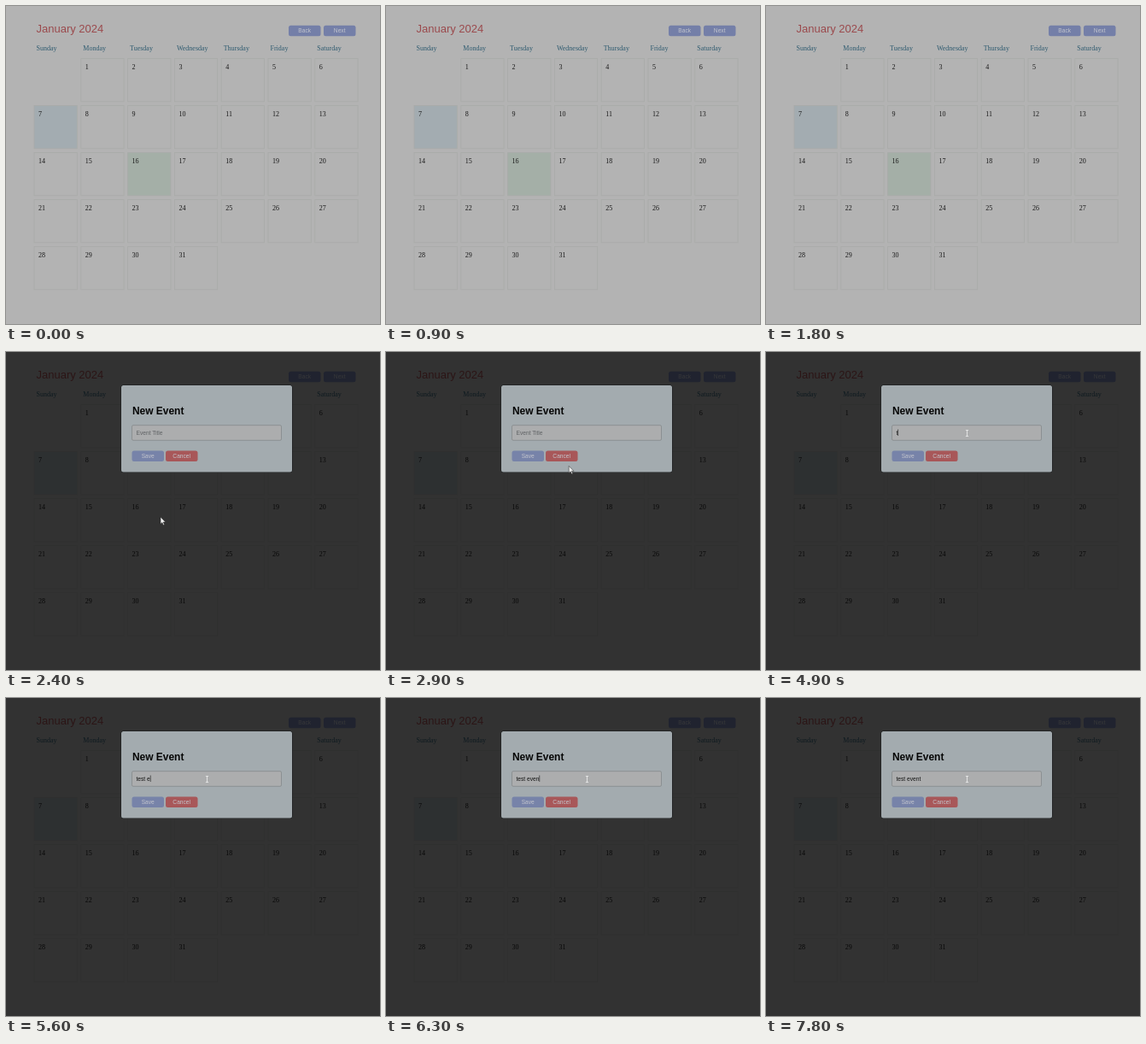
Recreate the animation shown at these times as an HTML page. Size 438 px wide and 372 px high, loop 8000 ms.

```html
<!DOCTYPE html>
<html lang="en">
<head>
<meta charset="utf-8">
<title>Calendar: new event</title>
<style>
html, body { margin: 0; width: 100%; height: 100%; overflow: hidden; background: #b3b3b3; }
svg { display: block; width: 438px; height: 372px; }
text { white-space: pre; }
.serif { font: 8px "Liberation Serif", "Times New Roman", serif; }
.sans { font: 6.65px "Liberation Sans", Arial, sans-serif; }
.month { font-size: 13px; }
.heading { font-size: 11.95px; font-weight: bold; }
</style>
</head>
<body>
<svg id="stage" viewBox="0 0 438 372">
  <rect width="438" height="372" fill="#b3b3b3"/>
  <g id="calendar"></g>
  <g id="dialog">
    <rect width="438" height="372" fill="#000" fill-opacity=".72"/>
    <rect x="134.5" y="38.5" width="201" height="102.5" rx="3" fill="#16191a"/>
    <rect x="135" y="39" width="200" height="101.5" rx="2.5" fill="#a3abaf"/>
    <text class="sans heading" x="148" y="72.8" fill="#050505">New Event</text>
    <rect x="147.5" y="85.7" width="175" height="17.6" rx="1.5" fill="#acadae" stroke="#85898b" stroke-width=".8"/>
    <text id="entry" class="sans" x="152.5" y="96.6"></text>
    <rect id="caret" y="90.5" width=".6" height="7.5" fill="#151515"/>
    <g id="actions"></g>
    <path id="arrow" d="M0 0V8.2L1.9 6.5L3.2 9.5L4.5 8.9L3.2 6H5.8Z" fill="#eee" stroke="#222" stroke-width=".5"/>
    <path id="beam" d="M-1.6-3.5H1.6M0-3.5V3.5M-1.6 3.5H1.6" fill="none" stroke="#e8e8e8" stroke-width=".9"/>
  </g>
</svg>
<script>
const byId = id => document.getElementById(id);

function add(parent, tag, attrs, content = "") {
  const node = document.createElementNS("http://www.w3.org/2000/svg", tag);
  for (const key in attrs) node.setAttribute(key, attrs[key]);
  node.textContent = content;
  return parent.appendChild(node);
}

function addButton(parent, x, y, label, fill) {
  add(parent, "rect", { x, y, width: 37.5, height: 12.5, rx: 2.5, fill });
  add(parent, "text", { class: "sans", x: x + 18.7, y: y + 8.6, fill: "#c3c5cc", "text-anchor": "middle" }, label);
}

function buildCalendar() {
  const root = byId("calendar");
  const pitch = 54.8;
  const fills = { 7: "#a3acb1", 16: "#a4afa7" };
  add(root, "text", { class: "sans month", x: 35.5, y: 31, fill: "#9b4a4d" }, "January 2024");
  addButton(root, 331, 22.7, "Back", "#747fa8");
  addButton(root, 372, 22.7, "Next", "#747fa8");

  ["Sunday", "Monday", "Tuesday", "Wednesday", "Thursday", "Friday", "Saturday"].forEach((name, i) =>
    add(root, "text", { class: "serif", x: 35.5 + i * pitch, y: 52.2, fill: "#2f5b70" }, name));

  for (let day = 1; day <= 31; day++) {
    const x = 33 + day % 7 * pitch;
    const y = 61.5 + Math.floor(day / 7) * 55;
    const cell = add(root, "rect", {
      x, y, width: 50.3, height: 50.3, fill: fills[day] || "#b3b3b3", stroke: "#a9aba8", "stroke-width": .8
    });
    if (day === 16) cell.id = "hovered";
    add(root, "text", { class: "serif", x: x + 5, y: y + 12.4, fill: "#181818" }, day);
  }
}

buildCalendar();
addButton(byId("actions"), 147.5, 115.5, "Save", "#7783a9");
addButton(byId("actions"), 187, 115.5, "Cancel", "#a85759");

const LOOP = 8000, OPEN = 2400, REST = 3600;
const phrase = "test event";
const keyTimes = [4900, 5000, 5200, 5300, 5400, 5600, 5800, 6000, 6200, 7100];
const [dialog, entry, caret, arrow, beam, hovered] =
  ["dialog", "entry", "caret", "arrow", "beam", "hovered"].map(byId);
const show = (node, on) => node.setAttribute("display", on ? "inline" : "none");

function render(time) {
  const t = Math.floor(time % LOOP / 100) * 100;
  const open = t >= OPEN;
  show(dialog, open);
  hovered.setAttribute("fill", open ? "#b3b3b3" : "#a4afa7");
  if (!open) return;

  const typed = phrase.slice(0, keyTimes.filter(k => k <= t).length);
  entry.textContent = typed || "Event Title";
  entry.setAttribute("fill", typed ? "#151515" : "#606365");
  show(caret, typed && t < 6800);
  caret.setAttribute("x", 152.6 + (typed ? entry.getComputedTextLength() : 0));

  // The pointer slows down as it reaches the text field.
  const progress = Math.sin(Math.min(1, (t - OPEN) / (REST - OPEN)) * Math.PI / 2);
  const x = 181 + 54.5 * progress;
  const y = 193 - 98 * progress;
  const inField = y < 103.3;
  show(arrow, !inField);
  show(beam, inField);
  (inField ? beam : arrow).setAttribute("transform", `translate(${x} ${y})`);
}

const start = performance.now();
function tick() {
  render(performance.now() - start);
  requestAnimationFrame(tick);
}
tick();
</script>
</body>
</html>
```
